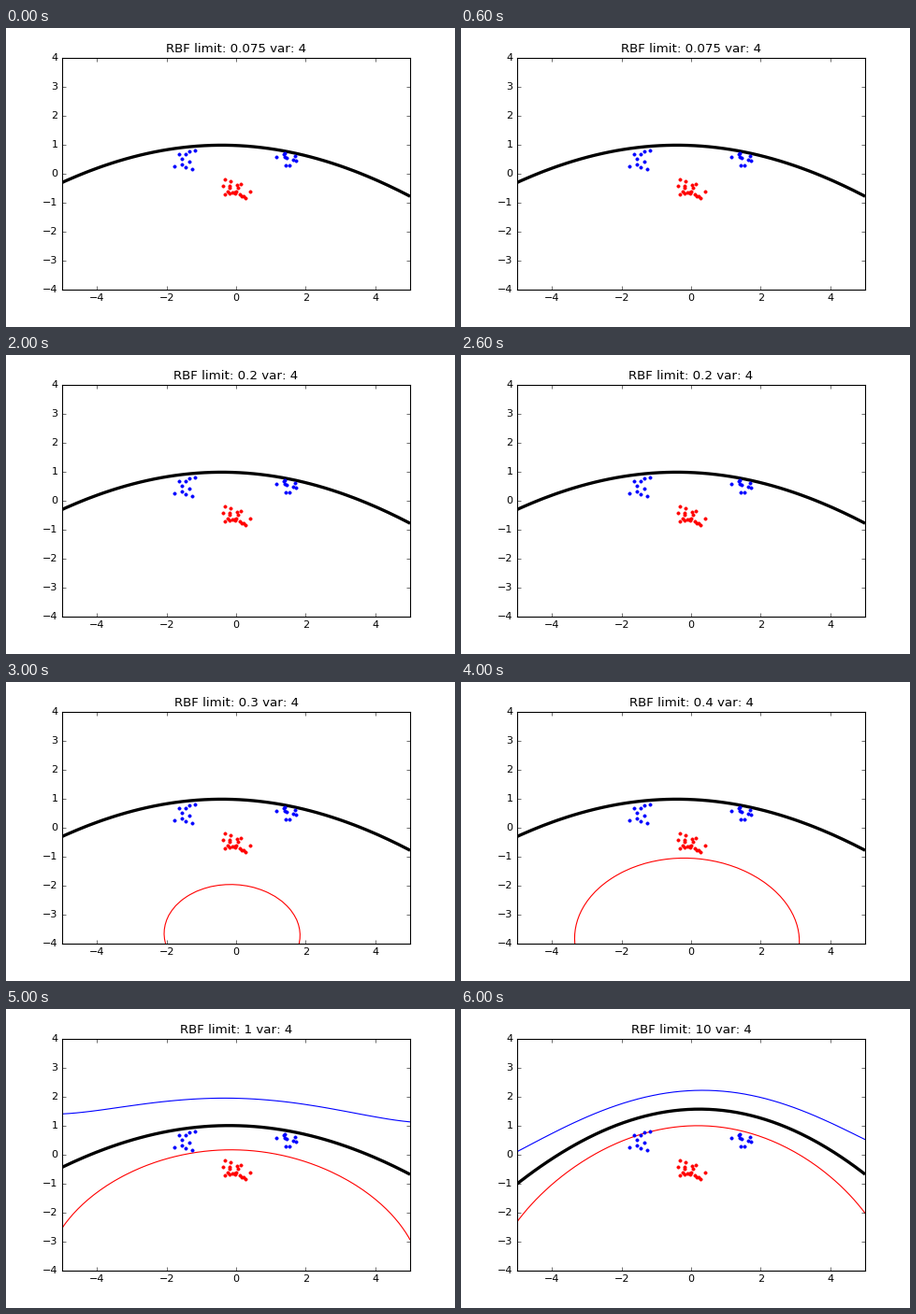
Write a matplotlib script that moves like this. It is 480 px wide and 320 px high and loops after 7000 ms.

```python
import matplotlib.pyplot as plt
import numpy as np
from matplotlib.animation import FuncAnimation

plt.style.use("classic")
plt.rcParams.update({
    "font.family": "DejaVu Sans",
    "font.size": 10,
    "text.kerning_factor": 12,  # large enough to switch kerning off
    "savefig.dpi": "figure",
    "figure.facecolor": "white",
})

SIGMA = 4
SPREAD = 0.2
LIMITS = [0.075, 0.1, 0.2, 0.3, 0.4, 1, 10]


def cluster(count, center):
    return np.random.randn(count, 2) * SPREAD + center


def kernel(a, b):
    d2 = ((a[:, None, :] - b[None, :, :]) ** 2).sum(axis=2)
    return np.exp(-d2 / (2 * SIGMA ** 2))


np.random.seed(100)
blue = np.vstack([cluster(10, (1.5, 0.5)), cluster(10, (-1.5, 0.5))])
red = cluster(20, (0, -0.5))
samples = np.vstack([blue, red])
labels = np.repeat([1.0, -1.0], [len(blue), len(red)])
gram = kernel(samples, samples)


def train(limit, tol=1e-5, max_steps=30000):
    """Solve the soft-margin dual by pairwise updates."""
    alpha = np.zeros(len(labels))
    grad = -np.ones(len(labels))
    for _ in range(max_steps):
        below, above = alpha < limit - 1e-9, alpha > 1e-9
        up = np.where(labels > 0, below, above)
        low = np.where(labels > 0, above, below)
        score = -labels * grad
        if not up.any() or not low.any():
            break
        i = np.argmax(np.where(up, score, -np.inf))
        gap = score[i] - score
        valid = low & (gap > tol)
        if not valid.any():
            break
        curve = np.maximum(2 - 2 * gram[i], 1e-10)
        j = np.argmax(np.where(valid, gap ** 2 / curve, -1))
        room_i = limit - alpha[i] if labels[i] > 0 else alpha[i]
        room_j = alpha[j] if labels[j] > 0 else limit - alpha[j]
        step = min(gap[j] / curve[j], room_i, room_j)
        alpha[i] += labels[i] * step
        alpha[j] -= labels[j] * step
        grad += labels * (gram[i] - gram[j]) * step
    return alpha


gx, gy = np.meshgrid(np.linspace(-5, 5), np.linspace(-4, 4))
grid = np.column_stack([gx.ravel(), gy.ravel()])
grid_kernel = kernel(grid, samples)
fields = [(grid_kernel @ (train(limit) * labels)).reshape(gx.shape)
          for limit in LIMITS]

fig = plt.figure(figsize=(6, 4), dpi=80, facecolor="white")
ax = fig.add_axes([0.125, 0.125, 0.775, 0.775])
ax.plot(*blue.T, "b.", zorder=3)
ax.plot(*red.T, "r.", zorder=3)
ax.set_xticks(range(-4, 5, 2))
ax.set_yticks(range(-4, 5))
ax.set_xlim(-5, 5)
ax.set_ylim(-4, 4)
title = ax.set_title("")
shown = []


def update(frame):
    while shown:
        shown.pop().remove()
    shown.append(ax.contour(gx, gy, fields[frame], [-1, 0, 1],
                            colors=["red", "black", "blue"],
                            linewidths=[1, 3, 1], linestyles="solid"))
    title.set_text(f"RBF limit: {LIMITS[frame]:g} var: {SIGMA}")
    return []


def init():
    return update(0)


anim = FuncAnimation(fig, update, frames=len(LIMITS), init_func=init,
                     interval=1000, repeat=True, repeat_delay=0)
plt.show()
```
